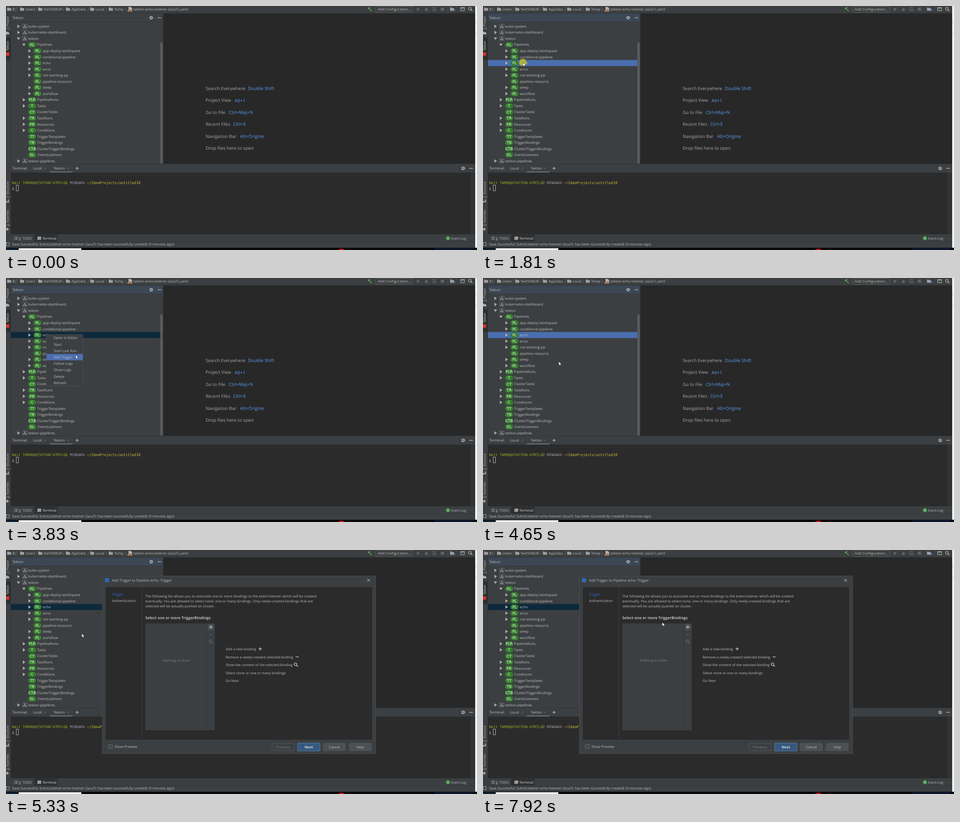
Recreate the animation shown at these times as an HTML page. Size 1038 by 540 pixels, loop 8000 ms.

```html
<!DOCTYPE html>
<html lang="en">
<head>
<meta charset="utf-8">
<title>Add trigger to pipeline</title>
<style>
  html, body { margin: 0; width: 100%; height: 100%; overflow: hidden; background: #3c3f41; }
  svg { display: block; width: 1038px; height: 540px; }
  text { font-family: "Open Sans", "Noto Sans", sans-serif; text-rendering: geometricPrecision; white-space: pre; }
  .mono { font-family: "DejaVu Sans Mono", monospace; }
  .badge { font-family: "DejaVu Sans", sans-serif; }
</style>
</head>
<body>
<svg id="stage" viewBox="0 0 1038 540"></svg>
<script>
const LOOP = 8000;
const FG = '#bbbbbb', PANEL = '#3c3f41', DARK = '#2b2b2b', LINE = '#323232';
const ICON = '#afb1b3', DIM = '#616466', ACTIVE = '#4b6eaf', INACTIVE = '#0d293e', LINK = '#589df6';

let layer = document.getElementById('stage');

function add(tag, attrs, content) {
  const node = document.createElementNS('http://www.w3.org/2000/svg', tag);
  for (const key in attrs) node.setAttribute(key, attrs[key]);
  if (content !== undefined) node.textContent = content;
  layer.appendChild(node);
  return node;
}
function group(draw) {
  const parent = layer, node = layer = add('g', {});
  draw();
  layer = parent;
  return node;
}
const rect = (x, y, width, height, fill, more) => add('rect', { x, y, width, height, fill, ...more });
const fill = (d, color = ICON) => add('path', { d, fill: color });
const stroke = (d, color = ICON, width = 1) => add('path', { d, fill: 'none', stroke: color, 'stroke-width': width });
const disc = (cx, cy, r, color) => add('circle', { cx, cy, r, fill: color });

// Text is placed by the middle of its capitals.
const label = (x, y, str, color = FG, size = 7.85, more) =>
  add('text', { x, y: y + size * 0.357, fill: color, 'font-size': size, ...more }, str);

// Label whose first character is an underlined shortcut.
function mnemonic(node) {
  const str = node.textContent;
  node.textContent = '';
  const parent = layer;
  layer = node;
  add('tspan', { 'text-decoration': 'underline' }, str[0]);
  add('tspan', {}, str.slice(1));
  layer = parent;
}

// Icons, each centred on x, y
const folder = (x, y) => fill(`M${x - 4.5} ${y - 3.6}h3.6l1.3 1.4h4.1v5.8h-9z`, '#9da0a3');
const chevron = (x, y) => stroke(`M${x - 1.4} ${y - 4}l2.6 4l-2.6 4`, '#747779', 0.8);
const plus = (x, y, color) => stroke(`M${x - 3.5} ${y}h7M${x} ${y - 3.5}v7`, color, 1.4);
const minus = (x, y, color, r = 3.5) => stroke(`M${x - r} ${y}h${2 * r}`, color, 1.4);
const cross = (x, y, r, color, width) =>
  stroke(`M${x - r} ${y - r}l${2 * r} ${2 * r}M${x + r} ${y - r}l${-2 * r} ${2 * r}`, color, width);
function lens(x, y, color) {
  add('circle', { cx: x - 1, cy: y - 1, r: 2.9, fill: 'none', stroke: color, 'stroke-width': 1.3 });
  stroke(`M${x + 1.1} ${y + 1.1}l3 3`, color, 1.6);
}
function gear(x, y) {
  add('circle', { cx: x, cy: y, r: 2.3, fill: 'none', stroke: ICON, 'stroke-width': 1.7 });
  add('circle', { cx: x, cy: y, r: 3.6, fill: 'none', stroke: ICON, 'stroke-width': 1.3, 'stroke-dasharray': '1.9 1.87' });
}
function consoleIcon(x, y) {
  rect(x - 4, y - 3.5, 8, 7, ICON);
  stroke(`M${x - 2.5} ${y - 2}l1.8 1.8l-1.8 1.8M${x} ${y + 2}h2.6`, PANEL, 0.9);
}
function namespaceIcon(x, y) {
  rect(x - 4.7, y - 4.7, 9.4, 9.4, 'none', { stroke: '#7f8284', 'stroke-width': 0.7 });
  stroke(`M${x} ${y - 1}v1.2M${x - 2} ${y + 1.5}v-1.2h4v1.2`, ICON, 0.6);
  for (const [dx, dy] of [[0, -2], [-2, 2], [2, 2]]) rect(x + dx - 1.1, y + dy - 1.1, 2.2, 2.2, ICON);
}
const arrow = (x, y, open) =>
  fill(open ? `M${x - 3.8} ${y - 2.4}h7.6l-3.8 5.4z` : `M${x - 2.4} ${y - 3.8}v7.6l5.6 -3.8z`, '#adadad');

function drawTopBar() {
  rect(0, 0, 1034, 15.5, PANEL);
  rect(0, 15.5, 1034, 1, LINE);
  const crumbs = [[7, 'C:'], [35.5, 'Users'], [75.5, 'NeilTAMUR'], [136.5, 'AppData'], [190, 'Local'], [231, 'Temp']];
  const seps = [24, 66, 127, 181, 221, 263];
  crumbs.forEach(([x, name], i) => {
    folder(x, 7);
    label(x + 7.5, 7, name, FG, 7.85, i ? {} : { 'font-weight': 700 });
    chevron(seps[i], 7);
  });
  fill('M270 2h5l3 3v3h-8z');
  rect(268, 8, 10.5, 4.4, '#a97b5c');
  label(281, 7, 'tekton-echo-listener-2aca7c.yaml', FG, 7.8);

  stroke('M800 5l6 6.5', '#59a34f', 1.8);
  stroke('M797.5 6.6l4.6 -4', '#59a34f', 2.4);
  rect(815, 0.5, 81, 13.5, PANEL, { rx: 2, stroke: '#5e6060' });
  label(819.5, 7, 'Add Configuration...', FG, 7.85);
  fill('M905.5 3v8.4l7 -4.2z', DIM);
  add('ellipse', { cx: 926.5, cy: 7.8, rx: 2.7, ry: 3.4, fill: DIM });
  stroke('M922.5 5.5l8 5M930.5 5.5l-8 5M926.5 3v2', DIM, 0.9);
  stroke('M940 3.4h5.6v3.4M940 3.4v4q0.5 2.6 3 4', DIM, 1.4);
  fill('M944 6v6l5 -3z', DIM);
  rect(958.3, 3.5, 7, 7, DIM);
  rect(973, 2, 0.7, 11, '#515151');
  folder(983, 7);
  for (const x of [984.2, 987]) rect(x, 8, 2.2, 2.4, '#3f9bd1');
  rect(995, 2, 0.7, 11, '#515151');
  rect(1002, 3.5, 8.4, 7, 'none', { stroke: ICON, 'stroke-width': 1 });
  rect(1002, 3, 8.4, 2, ICON);
  fill('M1004.5 6v3.6l3 -1.8z', '#59a34f');
  lens(1023.5, 7, ICON);
}

function drawStripe() {
  rect(0, 16.5, 10, 504.5, PANEL);
  rect(0, 69.5, 10, 49.5, '#2d2f30');
  rect(10, 16.5, 1, 489, LINE);
  const tab = (y, name, color) =>
    add('text', { transform: `translate(6 ${y}) rotate(-90)`, fill: color || FG, 'font-size': 6.75 }, name);
  mnemonic(tab(52, '1: Project'));
  tab(98.5, 'Tekton', '#dddddd');
  mnemonic(tab(425, '7: Structure'));
  mnemonic(tab(487, '2: Favorites'));
  fill('M0 57h3l1 1.2h3v4.6h-7z');
  rect(0, 102.8, 7, 7, '#d8342b');
  for (const [x, y] of [[0, 432], [3.8, 432], [3.8, 428.5]]) rect(x, y, 2.8, 2.8, ICON);
  const star = Array.from({ length: 10 }, (_, i) => {
    const r = i % 2 ? 1.8 : 4.4, a = i * Math.PI / 5;
    return `${(3 + r * Math.sin(a)).toFixed(2)} ${(494 - r * Math.cos(a)).toFixed(2)}`;
  });
  fill(`M${star.join('L')}z`);
}

// level, arrow (+ collapsed, - expanded, blank none), badge, name
const TREE = `
0+|kube-system
0+|kubernetes-dashboard
0-|tekton
1-PL|Pipelines
2+PL|app-deploy-workspace
2+PL|conditional-pipeline
2+PL|echo
2+PL|error
2+PL|not-working-pp
2 PL|pipeline-resource
2+PL|sleep
2+PL|workflow
1+PLR|PipelineRuns
1+T|Tasks
1 CT|ClusterTasks
1+TR|TaskRuns
1+PR|Resources
1+C|Conditions
1 TT|TriggerTemplates
1 TB|TriggerBindings
1 CTB|ClusterTriggerBindings
1 EL|EventListeners
0+|tekton-pipelines`.trim().split('\n');

function drawTree() {
  TREE.forEach((row, i) => {
    const [head, name] = row.split('|'), level = +head[0], badge = head.slice(2);
    const y = 45 + 13.545 * i;
    if (head[1] !== ' ') arrow([27.5, 39.5, 51.8][level], y, head[1] === '-');
    if (badge) {
      const x = level === 1 ? 57.6 : 69.4;
      rect(x - 8.8, y - 5.6, 17.6, 11.2, '#34802c', { rx: 5.4 });
      label(x, y, badge, '#f0f4ee', 8.2, { 'text-anchor': 'middle', class: 'badge' });
    } else namespaceIcon(41.5, y);
    label([49, 68.5, 81][level] + (badge === 'EL' ? 1.2 : 0), y, name);
  });
  rect(340, 81, 5.5, 268, '#595b5d');
}

function drawEditor() {
  rect(346, 16.5, 1, 333, LINE);
  rect(347, 16.5, 687, 333, '#282828');
  const hints = [['Search Everywhere', 533, 'Double Shift'], ['Project View', 503.5, 'Alt+1'],
    ['Go to File', 491, 'Ctrl+Maj+N'], ['Recent Files', 500.5, 'Ctrl+E'],
    ['Navigation Bar', 516, 'Alt+Origine'], ['Drop files here to open']];
  hints.forEach(([text, x, keys], i) => {
    const y = 182.5 + 26.4 * i;
    label(440, y, text, '#a9a9a9', 9.9);
    if (keys) label(x, y, keys, LINK, 10.1);
  });
}

function drawTerminal() {
  rect(0, 349, 1034, 1, LINE);
  rect(11, 350, 1023, 18.5, PANEL);
  label(14, 359.5, 'Terminal:');
  label(60, 359.5, 'Local');
  cross(86.5, 359.5, 2, '#77797b', 0.8);
  rect(96.5, 366.3, 50.5, 2.2, '#747a80');
  label(105, 359.5, 'Tekton');
  cross(136.5, 359.5, 2, '#77797b', 0.8);
  plus(156.7, 359.3, ICON);
  gear(1007.5, 359.3);
  minus(1025, 359.3, ICON, 4);

  rect(11, 368.5, 1013, 137, DARK);
  rect(1024, 368.5, 10, 137, '#313335');
  const mono = (x, y, str, color) => label(x, y, str, color, 7.85, { class: 'mono' });
  mono(13.2, 391, 'Neil TAMUR@STATION-K7RTLQD', '#a0ab20');
  mono(140.7, 391, 'MINGW64', '#a29ca6');
  mono(178.2, 391, '~/IdeaProjects/untitled18', '#cdbf3a');
  mono(13.2, 404, '$', FG);
  rect(22.5, 396.5, 5, 12.5, 'none', { stroke: '#c4c4c4', 'stroke-width': 0.9 });
}

function drawBottom() {
  rect(0, 505.5, 1034, 29.5, PANEL);
  rect(62, 505.5, 51.5, 16, '#2d2f30');
  rect(0, 521, 1034, 0.8, LINE);
  stroke('M18 511.5h1.4M20.4 511.5h5M18 514h1.4M20.4 514h5M18 516.5h1.4M20.4 516.5h5', ICON, 1.1);
  mnemonic(label(28, 514, '6: TODO', FG, 7.5));
  consoleIcon(73.3, 514);
  label(80, 514, 'Terminal', '#dddddd', 7.6);
  disc(974, 514, 4.6, '#4c9a4f');
  label(974, 514, '3', '#ffffff', 6, { 'text-anchor': 'middle' });
  label(981, 514, 'Event Log', FG, 7.3);
  rect(1, 523.5, 6, 7, 'none', { stroke: ICON, 'stroke-width': 0.9 });
  label(13.3, 527.5, 'Save Successful: EventListener echo-listener-2aca7c has been successfully created! (9 minutes ago)', FG, 7.8);

  rect(0, 535, 1038, 5, '#06080b');
  rect(0, 536, 28, 4, '#10202e');
  rect(28, 536, 138, 4, '#eceaec');
  rect(945, 536, 85, 4, '#0d1730');
  label(964, 542.4, '11:30', '#c5cad2', 7);
  disc(739, 549, 12, '#cc1010');
  rect(1034, 0, 4, 535, '#f4f4f4');
  rect(1034, 36, 4, 1, '#b8b8b8');
  rect(1034, 60, 4, 1, '#c8c8c8');
}

const MENU = ['Open in Editor', 'Start', 'Start Last Run', 'Add Trigger', 'Follow Logs', 'Show Logs', 'Delete', 'Refresh'];
const MENU_TOP = 125.4, MENU_ROW = 14.2;

function drawDialogFrame() {
  rect(212, 57, 603, 394, PANEL);
  rect(212.5, 57.5, 602, 393, 'none', { stroke: '#4b4e50' });
  rect(218, 62.5, 9, 9, '#3069b8');
  label(233.5, 67, 'Add Trigger to Pipeline echo: Trigger', FG, 7.85);
  cross(799, 67, 3.2, '#c8c8c8', 1);
}

function drawDialogBody() {
  rect(220, 82, 587, 338, DARK);
  rect(299.3, 82, 1, 338, '#3f4244');
  label(233.5, 98, 'Trigger', '#2f65ca');
  label(233.5, 112.7, 'Authentication', FG, 7.7);
  ['The following list allows you to associate one or more bindings to the event-listener which will be created',
    'eventually. You are allowed to select none, one or many bindings. Only newly-created bindings that are',
    'selected will be actually pushed on cluster.'
  ].forEach((line, i) => label(307, 102.3 + 10.9 * i, line, FG, 7.75));
  label(307, 150.3, 'Select one or more TriggerBindings', FG, 8.3, { 'font-weight': 700 });

  rect(307, 162.5, 153, 236.5, PANEL);
  rect(441.8, 162.5, 0.8, 236.5, LINE);
  label(345, 244, 'Nothing to show', '#7b7d7f', 7.8);
  rect(445, 164, 13, 13, '#4c5052', { rx: 1.5 });
  plus(451.4, 170.5, '#c4c6c8');
  minus(451.4, 187, DIM);
  lens(451.4, 203, DIM);

  const hints = ['Add a new binding', 'Remove a newly-created selected binding',
    'Show the content of the selected binding', 'Select none or one or many bindings', 'Go Next'];
  hints.forEach((hint, i) => label(484, 219.2 + 17.6 * i, hint, FG, 7.75));
  plus(560.2, 218.8, '#c4c6c8');
  minus(641.8, 236.6, '#c4c6c8');
  lens(639, 253.8, '#c4c6c8');

  rect(225.7, 430.3, 9, 9, '#43494a', { stroke: '#6b6b6b', 'stroke-width': 0.8 });
  label(239, 435.5, 'Show Preview');
  const button = (x, w, name, face, edge, color, more) => {
    rect(x, 428, w, 16, face, { rx: 2, stroke: edge, 'stroke-width': 0.8 });
    label(x + w / 2, 436, name, color, 7.75, { 'text-anchor': 'middle', ...more });
  };
  button(586.3, 48.5, 'Previous', PANEL, '#5e6060', '#777777');
  rect(641.8, 426.6, 51, 18.8, '#43698e', { rx: 3 });
  button(643, 48.5, 'Next', '#365880', '#4c708c', '#d0d4d8', { 'font-weight': 700 });
  button(699.5, 48.5, 'Cancel', '#4c5052', '#5e6060', FG);
  button(756.5, 48.5, 'Help', '#4c5052', '#5e6060', FG);
}

rect(0, 0, 1038, 540, PANEL);
drawTopBar();
drawStripe();
const header = rect(11, 16.5, 335, 18.5, PANEL);
rect(11, 35, 335, 1, LINE);
label(14, 26, 'Tekton');
gear(320, 26);
minus(338, 26, ICON, 4);
const selection = rect(11, 119.4, 335, 13.5, ACTIVE);
drawTree();
drawEditor();
drawTerminal();
drawBottom();
let hover;
const menu = group(() => {
  rect(88.8, 125, 80.7, 114, PANEL, { stroke: '#515456', 'stroke-width': 0.7 });
  hover = rect(89.2, 0, 80, MENU_ROW, ACTIVE);
  MENU.forEach((item, i) => label(105, MENU_TOP + MENU_ROW * (i + 0.5), item));
});
const dialogFrame = group(drawDialogFrame);
const dialogBody = group(drawDialogBody);
const click = disc(0, 0, 8.2, '#b9b72f');
click.setAttribute('opacity', 0.9);
const pointer = add('path', {
  d: 'M0 0V8.2L1.9 6.5 3.1 9.2 4.5 8.6 3.3 6H5.9Z', fill: '#ffffff', stroke: '#111111', 'stroke-width': 0.5
});

// start, end, number of steps, destination
const MOVES = [
  [250, 740, 7, 163, 169], [950, 1350, 6, 80, 127], [1580, 1660, 2, 88, 125],
  [3290, 3920, 9, 163, 177], [4320, 4650, 5, 167, 185], [5720, 6280, 8, 352, 269],
  [6450, 6580, 3, 359, 267], [6900, 7070, 3, 433, 250], [7220, 7300, 2, 364, 174],
  [7470, 7620, 3, 328, 154], [7840, 7920, 2, 395, 160]
];
const CLICKS = [[1740, 1900], [2050, 2200], [4150, 4240]];

const within = (t, a, b) => t >= a && t < b;
const show = (node, on) => node.setAttribute('visibility', on ? 'visible' : 'hidden');

function pointerAt(t) {
  let x = 1039, y = 555;
  for (const [start, end, steps, toX, toY] of MOVES) {
    if (t < start) break;
    const step = Math.min(steps, 1 + Math.floor((t - start) / (end - start) * (steps - 1) + 1e-6));
    const p = step / steps, ease = p * p * (3 - 2 * p);
    x += (toX - x) * ease;
    y += (toY - y) * ease;
  }
  return [x, y];
}

function render(t) {
  const [x, y] = pointerAt(t), place = `translate(${x.toFixed(2)} ${y.toFixed(2)})`;
  pointer.setAttribute('transform', place);
  click.setAttribute('transform', place);
  show(click, CLICKS.some(([a, b]) => within(t, a, b)));

  const menuOpen = within(t, 2200, 4240);
  header.setAttribute('fill', t >= 1810 ? '#3b4754' : PANEL);
  show(selection, t >= 1810);
  selection.setAttribute('fill', menuOpen || t >= 5090 ? INACTIVE : ACTIVE);
  show(menu, menuOpen);
  show(hover, menuOpen && t >= 3365);
  hover.setAttribute('y', MENU_TOP + MENU_ROW * Math.max(0, Math.floor((y - MENU_TOP) / MENU_ROW)));
  show(dialogFrame, t >= 5170);
  show(dialogBody, t >= 5250);
}

const began = performance.now();
function tick() {
  render((performance.now() - began) % LOOP);
  requestAnimationFrame(tick);
}
render(0);
requestAnimationFrame(tick);
</script>
</body>
</html>
```
